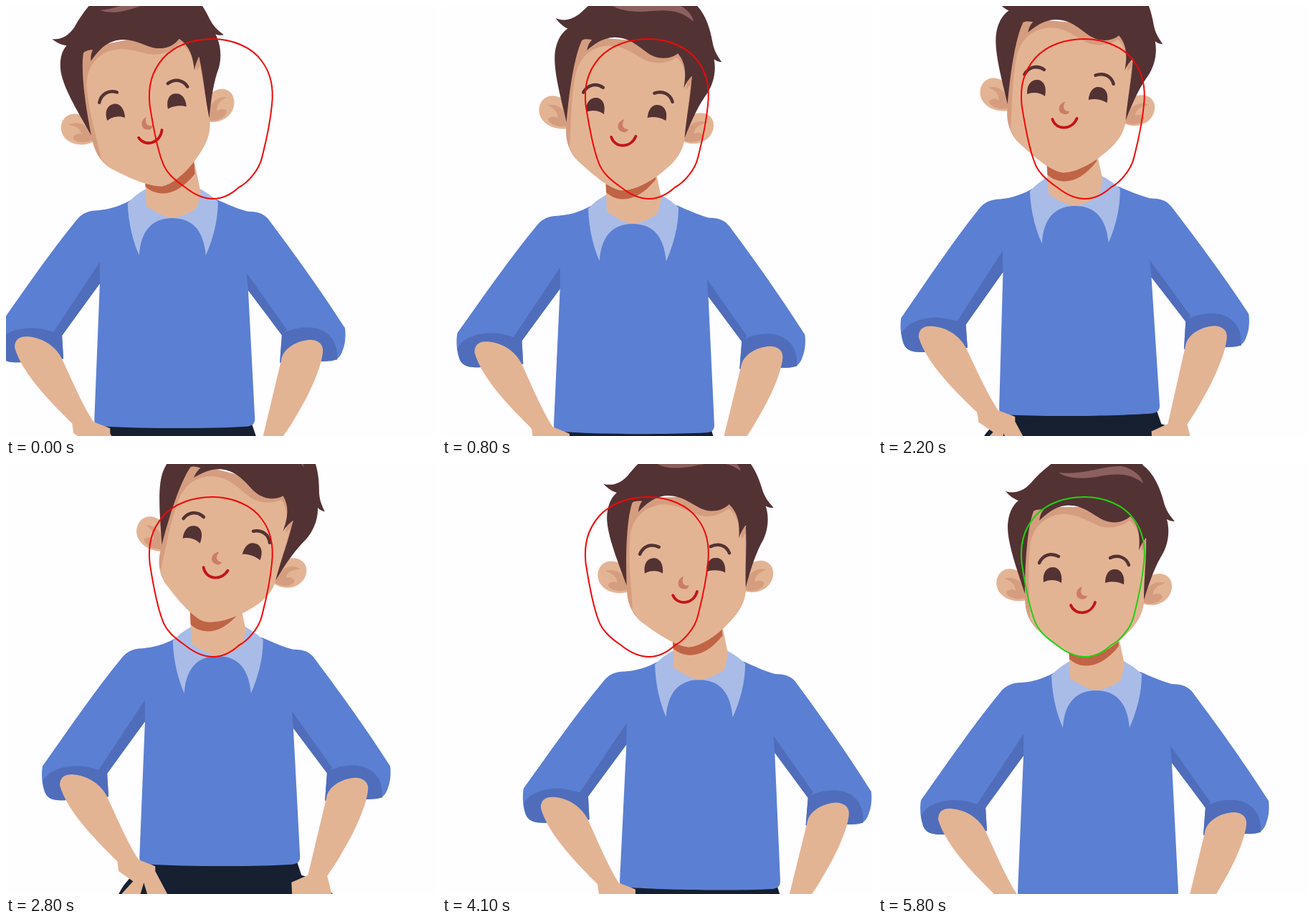
These frames come from a looping animation (600x600 px, 6 s). An HTML page with a canvas:

```html
<!DOCTYPE html>
<html lang="en">
<head>
<meta charset="utf-8">
<title>Face alignment</title>
<style>
html, body { margin: 0; width: 100%; height: 100%; overflow: hidden; background: #fefdff; }
canvas { display: block; width: 600px; height: 600px; }
</style>
</head>
<body>
<canvas id="stage" width="600" height="600"></canvas>
<script>
const ctx = document.getElementById('stage').getContext('2d');
const LOOP = 6000, STEP = 100, MATCHED_AT = 5500;
const WAIST = { x: 302, y: 450 }, NECK = { x: 296.5, y: 258 };

const color = {
  paper: '#fefdff', skin: '#e3b494', shade: '#d59d7f', neckShade: '#c06446', nose: '#ca7e63',
  hair: '#533233', gloss: '#8b605e', mouth: '#c41417', shirt: '#5b7fd2', fold: '#4f6dbb',
  collar: '#a9bce8', trousers: '#162031', waiting: '#f00808', matched: '#22d010'
};

// [time, value] keys: the figure's shift in pixels, its roll and the head's tilt in degrees
const shiftX = [[0, -72], [700, -38], [900, -39], [1350, -30], [1600, -34], [2100, -28], [2250, -28],
  [2800, -9], [3500, 38.5], [3900, 56], [4250, 51], [4700, 29], [4900, 13], [5200, 4], [5500, 0], [6000, 0]];
const shiftY = [[0, -20], [800, -12], [1600, -21.5], [2800, -48], [3500, -25.5], [4700, -7], [5500, 0], [6000, 0]];
const roll = [[0, -0.1], [800, 0.2], [1600, -1.2], [2800, -0.1], [3500, 0.8], [4700, 0], [6000, 0]];
const tilt = [[0, -11.4], [800, 4.5], [1600, -3.4], [2800, 14.4], [3500, -5.4], [4700, 0.4], [5500, 0], [6000, 0]];

// Smooth interpolation that never overshoots its keys
function valueAt(keys, t) {
  const slope = i => (keys[i + 1][1] - keys[i][1]) / (keys[i + 1][0] - keys[i][0]);
  const tangent = i => {
    if (i === 0) return slope(0);
    if (i === keys.length - 1) return 0;
    const a = slope(i - 1), b = slope(i);
    return a * b <= 0 ? 0 : 2 * a * b / (a + b);
  };
  let i = 0;
  while (i < keys.length - 2 && t >= keys[i + 1][0]) i++;
  const span = keys[i + 1][0] - keys[i][0], u = (t - keys[i][0]) / span, v = 1 - u;
  return keys[i][1] * (1 + 2 * u) * v * v + keys[i + 1][1] * u * u * (3 - 2 * u)
    + span * (tangent(i) * u * v * v - tangent(i + 1) * u * u * v);
}

const filled = (paint, d) => ({ paint, path: new Path2D(d) });
const stroked = (paint, width, d) => ({ paint, width, path: new Path2D(d) });

const body = [
  filled(color.trousers, 'M204 598 L413 598 L421 622 C440 628 456 634 467 652 L164 652 C172 632 186 622 200 606 Z'),
  filled(color.shirt, `M246 291 C230 300 215 304 200 305 C188 305 178 309 171 318 C130 368 95 420 60 469
    C58 480 59 495 63 505 C67 515 75 517 90 517 L152 512 L150 479 L203 407 L195 597 C195 604 198 606 204 606
    C260 610 360 610 408 607 C416 606 419 603 419 596 L410 417 L457 478 L454 518 L515 516
    C530 517 538 514 542 500 C546 490 546 478 545 470 C510 415 470 360 440 320
    C434 311 425 307 410 307 C395 303 380 296 366 290 Z`),
  filled(color.fold, 'M203 377 L203 407 L150 480 L138 475 Z'),
  filled(color.fold, 'M408 393 L410 417 L457 480 L464 472 Z'),
  filled(color.fold, `M60 491 C66 478 84 469 108 469 C122 469 136 474 150 478 L152 512 L90 517
    C75 517 67 515 63 505 Z`),
  filled(color.fold, 'M457 478 C470 470 490 467 505 470 C525 476 535 490 534 514 L515 516 L454 518 Z'),
  filled(color.skin, `M84 496 C84 484 92 480 103 481 C125 483 142 496 150 512 C163 540 180 580 194 600
    L217 609 L217 616 L236 652 L166 652 L186 630 L166 616 L164 602 C140 578 95 535 84 496 Z`),
  filled(color.trousers, 'M195 652 L201 632 L207 652 Z'),
  filled(color.skin, `M456 514 C458 500 475 487 497 486 C510 487 515 494 514 503 C512 525 495 562 479 588
    C470 605 462 615 457 623 L464 652 L408 652 L407 632 L430 622 Z`),
  filled(color.collar, `M266 276 C257 281 249 287 242 295 C243 325 250 350 258 368 C260 335 275 316 304 316
    C334 316 348 335 351 368 C361 345 368 320 368 293 C361 286 352 280 343 275 Z`),
  filled(color.skin, 'M266 250 L268 299 C280 307 292 314 304 316 C318 314 331 308 339 301 L344 280 L334 232 Z'),
  filled(color.neckShade, 'M266 250 L267 272 C284 288 312 285 336 254 L334 232 Z')
];

const head = [
  filled(color.skin, 'M205 158 C195 143 172 141 166 160 C161 180 182 196 207 190 Z'),
  filled(color.shade, 'M176 160 C188 156 198 162 204 172 L206 187 C194 191 180 186 179 179 C183 174 189 174 192 177 C192 168 186 163 176 160 Z'),
  filled(color.skin, 'M372 164 C382 150 403 149 409 164 C415 184 394 203 370 195 Z'),
  filled(color.shade, 'M401 166 C388 162 378 169 373 179 L370 193 C383 198 396 192 397 184 C393 180 387 180 384 183 C383 174 391 169 401 166 Z'),
  filled(color.shade, `M198 80 L217 60 L360 60 L375 110 L371 192 C369 212 360 226 336 247 C318 262 300 270 288 270
    C272 268 250 253 221 230 C209 217 205 203 205 187 L198 140 Z`),
  filled(color.skin, `M212 216 C212 185 208 150 212 115 C215 92 228 76 250 71 C275 66 291 80 310 87
    C326 91 340 87 351 79 C361 86 366 101 368 122 L373 115 L371 192 C369 212 360 226 336 247
    C318 262 300 270 288 270 C272 268 247 252 221 230 Z`),
  filled(color.hair, `M178 38 C190 42 202 38 212 28 C222 16 235 4 250 -6 C290 -50 345 -35 370 2
    C385 13 394 34 399 54 C402 65 407 72 414 80 C409 80 406 79 403 77 C408 95 404 112 398 124
    C388 140 380 160 371 190 C371 160 375 130 374 103 C370 108 366 114 364 121 C366 100 364 85 352 73
    C342 82 328 84 314 78 C298 70 285 56 262 58 C245 60 235 70 225 79 C226 72 228 67 231 64
    C224 63 219 64 217 66 C208 90 205 140 205 181 C195 150 180 110 181 85 C182 70 187 58 196 51
    C190 49 184 45 178 38 Z`),
  filled(color.gloss, 'M252 12 C285 16 315 2 340 3 C358 7 368 18 370 27 C350 11 330 14 310 17 C285 22 263 20 252 12 Z'),
  stroked(color.hair, 4.5, 'M225 138 C230 127 241 123 252 129'),
  stroked(color.hair, 4.5, 'M324 131 C335 126 346 130 350 141'),
  filled(color.hair, 'M231 165 C229 151 236 144 244 144 C252 144 258 152 256 166 C249 161 238 161 231 165 Z'),
  filled(color.hair, 'M317 166 C317 153 323 146 331 147 C339 147 345 155 343 168 C336 164 324 163 317 166 Z'),
  filled(color.nose, 'M285 171 C275 174 275 186 282 188 C287 190 291 188 292 184 C284 185 281 179 285 171 Z'),
  stroked(color.mouth, 3.8, 'M269 197 C275 212 297 211 303 193')
];

const guide = new Path2D(`M288 46 C315 46 343 57 357 77 C369 93 374 112 371 138 C368 170 361 196 357 212
  C353 229 337 247 325 253 C314 263 302 269 289 269 C273 269 260 261 250 253 C234 242 223 232 218 217
  C209 193 204 160 200.5 138 C198 112 203 92 219 73 C235 55 261 46 288 46 Z`);

function paintAll(parts) {
  for (const { paint, width, path } of parts) {
    if (width) {
      ctx.strokeStyle = paint;
      ctx.lineWidth = width;
      ctx.stroke(path);
    } else {
      ctx.fillStyle = paint;
      ctx.fill(path);
    }
  }
}

function turnAround(point, degrees) {
  ctx.translate(point.x, point.y);
  ctx.rotate(degrees * Math.PI / 180);
  ctx.translate(-point.x, -point.y);
}

function draw(time) {
  const t = Math.min(Math.floor((time % LOOP) / STEP) * STEP, LOOP - 2 * STEP);
  ctx.fillStyle = color.paper;
  ctx.fillRect(0, 0, 600, 600);
  ctx.lineCap = 'round';

  ctx.save();
  ctx.translate(valueAt(shiftX, t), valueAt(shiftY, t));
  turnAround(WAIST, valueAt(roll, t));
  paintAll(body);
  turnAround(NECK, valueAt(tilt, t));
  paintAll(head);
  ctx.restore();

  paintAll([{ paint: t < MATCHED_AT ? color.waiting : color.matched, width: 2, path: guide }]);
}

const start = performance.now();
function tick() {
  draw(performance.now() - start);
  requestAnimationFrame(tick);
}
tick();
</script>
</body>
</html>
```
